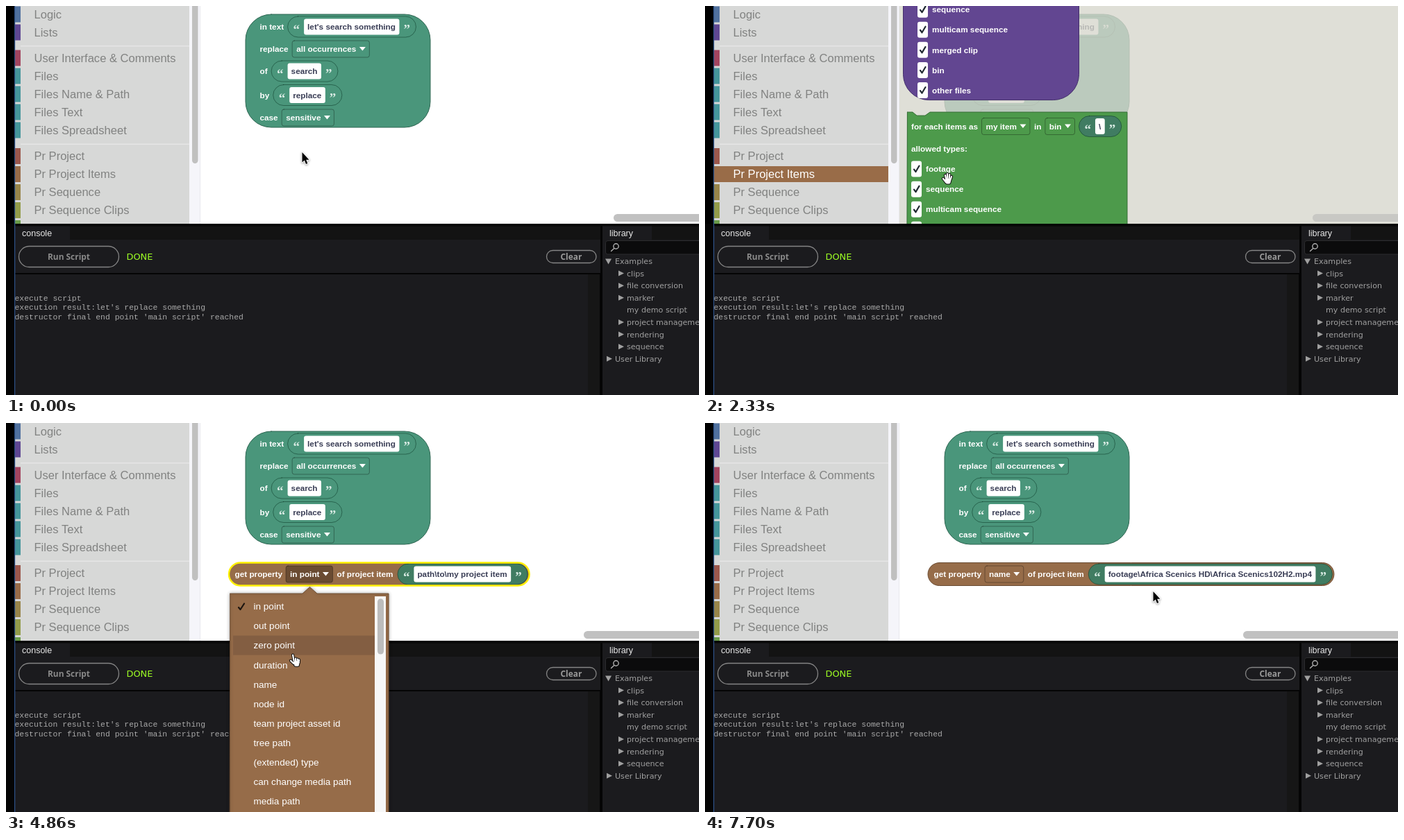
Write an HTML page with a canvas that moves like this. It is 998 by 561 pixels and loops after 8 s.

```html
<!DOCTYPE html>
<html>
<head>
<meta charset="utf-8">
<style>
html, body { margin: 0; width: 100%; height: 100%; overflow: hidden; background: #000; }
canvas { display: block; }
</style>
</head>
<body>
<canvas id="stage" width="998" height="561"></canvas>
<script>
const ctx = document.getElementById('stage').getContext('2d');
const LOOP = 8000;
const SANS = '"Liberation Sans", Arial, sans-serif';
const WIDE = '"DejaVu Sans", sans-serif';
const BLOCK_FONT = 'bold 11.76px ' + SANS;
const TEAL = '#4a967b', STRING = '#407c62', BROWN = '#966c49', GREEN = '#4d9a4b', PURPLE = '#624691';
const YELLOW = '#fff000';
const ITEM_PATH = 'path\\to\\my project item';
const FILE_PATH = 'footage\\Africa Scenics HD\\Africa Scenics102H2.mp4';

const clamp = v => Math.max(0, Math.min(1, v));
const progress = (t, from, to) => clamp((t - from) / (to - from));
const smooth = p => p * p * (3 - 2 * p);
const mix = (a, b, p) => a + (b - a) * p;

function rect(x, y, w, h, color) {
  ctx.fillStyle = color;
  ctx.fillRect(x, y, w, h);
}
function paint(fill, stroke, width = 1) {
  if (fill) { ctx.fillStyle = fill; ctx.fill(); }
  if (stroke) { ctx.strokeStyle = stroke; ctx.lineWidth = width; ctx.stroke(); }
}
function round(x, y, w, h, r, fill, stroke, width) {
  ctx.beginPath();
  ctx.roundRect(x, y, w, h, r);
  paint(fill, stroke, width);
}
function poly(points, fill, stroke, width) {
  ctx.beginPath();
  points.forEach(([x, y]) => ctx.lineTo(x, y));
  ctx.closePath();
  paint(fill, stroke, width);
}
// Text with its capitals centred on cy; returns the right edge.
function text(str, x, cy, font, color) {
  ctx.font = font;
  ctx.fillStyle = color;
  ctx.fillText(str, x, cy + 0.36 * parseFloat(font.match(/[\d.]+px/)[0]));
  return x + ctx.measureText(str).width;
}
const label = (str, x, cy) => text(str, x, cy, BLOCK_FONT, '#fff');

// Block parts
function dropdown(str, x, cy, open) {
  ctx.font = BLOCK_FONT;
  const w = ctx.measureText(str).width + 25;
  round(x, cy - 12, w, 24, 3, open ? '#6a4b32' : null, 'rgba(0,0,0,.32)');
  label(str, x + 6, cy);
  const a = x + w - 10;
  poly([[a - 4.5, cy - 3], [a + 4.5, cy - 3], [a, cy + 2.5]], '#fff');
  return x + w;
}
function stringPill(str, x, cy, fill, { selected, caret } = {}) {
  ctx.font = BLOCK_FONT;
  const tw = ctx.measureText(str).width, end = x + tw + 58;
  const quoteFont = 'bold 19px "Liberation Serif", serif';
  round(x, cy - 15, tw + 58, 30, 15, fill, 'rgba(0,40,25,.45)');
  text('“', x + 8, cy + 3.5, quoteFont, '#d9ebe4');
  text('”', end - 18, cy + 3.5, quoteFont, '#d9ebe4');
  round(x + 23.5, cy - 11.5, tw + 10.5, 23, 3, '#fff');
  if (selected) rect(x + 28.5, cy - 7.5, tw, 15, '#b4d5fe');
  text(str, x + 28.5, cy, BLOCK_FONT, '#393d55');
  if (caret) rect(x + 28.5 + tw, cy - 7, 1, 14, '#000');
  return end;
}
function checkRow(str, x, cy) {
  round(x, cy - 11.5, 15, 23, 3, '#fff');
  ctx.beginPath();
  ctx.moveTo(x + 4, cy + .5);
  ctx.lineTo(x + 6.5, cy + 4);
  ctx.lineTo(x + 11.5, cy - 4.5);
  paint(null, '#222b33', 2.2);
  label(str, x + 21, cy);
}
const notch = (x, y) => [[x + 8, y], [x + 14, y + 5], [x + 26, y + 5], [x + 33, y]];

function propertyRow(verb, x, cy, item, value, state = {}) {
  let end = label(verb + ' property', x, cy);
  end = dropdown(item, end + 5, cy, state.open);
  end = label('of project item', end + 6, cy);
  return stringPill(value, end + 6.5, cy, STRING, state);
}
function getProperty(x, cy, item, value, state) {
  ctx.font = BLOCK_FONT;
  const w = ['get property', item, 'of project item', value]
    .reduce((sum, s) => sum + ctx.measureText(s).width, 0) + 111.5;
  ctx.globalAlpha = state.dragging ? .8 : 1;
  round(x, cy - 16.5, w, 33, 16.5, BROWN);
  ctx.globalAlpha = 1;
  propertyRow('get', x + 8.5, cy, item, value, state);
  round(x, cy - 16.5, w, 33, 16.5, null, state.chosen ? YELLOW : '#6a4b32', state.chosen ? 2.4 : 1);
}

function searchBlock() {
  round(345, 12, 266, 163, 37, TEAL, '#2f6652');
  const rows = [['in text', 30, "let's search something"], ['replace', 62, null, 'all occurrences'],
    ['of', 94, 'search'], ['by', 128.5, 'replace'], ['case', 161, null, 'sensitive']];
  for (const [name, cy, str, choice] of rows) {
    const end = label(name, 365.5, cy) + 5.5;
    str ? stringPill(str, end, cy, null) : dropdown(choice, end, cy);
  }
}

const TYPES = ['footage', 'sequence', 'multicam sequence', 'merged clip', 'bin', 'other files'];

function flyout(scroll, chosen) {
  rect(279, 0, 719, 314, 'rgba(216,216,206,.8)');
  ctx.save();
  ctx.translate(0, -scroll);
  round(285.5, -120, 253, 258.5, 37, PURPLE, '#44306a');
  TYPES.forEach((type, i) => checkRow(type, 306, -21 + 29.1 * i));

  poly([[291, 156], ...notch(291, 156), [608, 156], [608, 400], ...notch(318, 400).reverse(), [318, 400],
    [318, 417], ...notch(318, 417), [608, 417], [608, 441], ...notch(291, 441).reverse(), [291, 441]],
    GREEN, '#356d35');
  let end = label('for each items as', 297, 176.5);
  end = dropdown('my item', end + 5.5, 176.5);
  end = label('in', end + 6, 176.5);
  end = dropdown('bin', end + 5.5, 176.5);
  stringPill('\\', end + 6, 176.5, STRING);
  label('allowed types:', 297, 209);
  TYPES.forEach((type, i) => checkRow(type, 297, 238 + 29.1 * i));
  label('do', 297, 409);

  getProperty(286.5, 481.5, 'in point', ITEM_PATH, { chosen });
  poly([[291, 516], ...notch(291, 516), [726, 516], [726, 560], [291, 560]], BROWN, '#6a4b32');
  propertyRow('set', 297, 537, 'in point', ITEM_PATH);
  ctx.restore();
}

const CATEGORIES = [['Logic', 12, '#50719f'], ['Lists', 38, '#5f4793'],
  ['User Interface & Comments', 75, '#a3445f'], ['Files', 101, '#45969b'],
  ['Files Name & Path', 127, '#45969b'], ['Files Text', 153, '#45969b'],
  ['Files Spreadsheet', 179, '#45969b'], ['Pr Project', 216.5, '#9c574c'],
  ['Pr Project Items', 242.5, '#996c48'], ['Pr Sequence', 268.5, '#98854a'],
  ['Pr Sequence Clips', 294.5, '#939c4a'], ['', 320.5, '#6a9c4a']];

function sidebar(flyoutOpen) {
  rect(13, 0, 251, 314, '#d7d8d7');
  rect(264, 0, 15, 314, '#f5f5fa');
  rect(279, 0, 1, 314, '#e8e8ee');
  round(268, -20, 8.5, 247, 4.2, '#c0c0c0');
  rect(21, 57, 243, 1.5, '#e6e6e6');
  rect(21, 198.5, 243, 1.5, '#e6e6e6');
  for (const [name, cy, color] of CATEGORIES) {
    const active = flyoutOpen && name === 'Pr Project Items';
    rect(13, cy - 11.5, active ? 251 : 8, 23, color);
    text(name, 40.5, cy, '16.55px ' + SANS, active ? '#fff' : '#818281');
  }
}

function panels() {
  rect(0, 314, 998, 247, '#050505');
  rect(13, 317.5, 843, 20, '#131313');
  rect(13, 317.5, 79, 20, '#1b1b1e');
  rect(13, 337, 843, 48, '#1b1b1e');
  rect(13, 387, 825, 174, '#1b1b1e');
  rect(838, 387, 17, 174, '#161616');
  rect(859, 317.5, 139, 20, '#131313');
  rect(859, 317.5, 71, 20, '#1b1b1e');
  rect(859, 337, 139, 224, '#1b1b1e');
  text('console', 23, 327, '12.5px ' + SANS, '#e8e8e8');
  text('library', 869, 327, '12.5px ' + SANS, '#e8e8e8');

  round(18.5, 346.5, 144, 30, 15, null, '#858585', 1.3);
  text('Run Script', 60, 361.5, 'bold 11.9px "Open Sans", sans-serif', '#8a8a8a');
  text('DONE', 173.5, 361.5, '12.9px ' + WIDE, '#9eff24');
  round(778.5, 352.5, 71.5, 18, 9, null, '#858585', 1.3);
  text('Clear', 798.5, 361.5, 'bold 11.9px "Open Sans", sans-serif', '#9a9a9a');

  ['execute script', "execution result:let's replace something",
    "destructor final end point 'main script' reached"].forEach((line, i) =>
    text(line, 12.5, 420.5 + 13.5 * i, '11.44px "Liberation Mono", monospace', '#a9a9a9'));

  round(863.5, 338.5, 150, 19.5, 3, '#0b0b0c', '#2c2c2e');
  ctx.beginPath();
  ctx.arc(878.5, 346.5, 3.7, 0, 7);
  ctx.moveTo(875.8, 349.5);
  ctx.lineTo(871.5, 353.5);
  paint(null, '#b0b0b0', 1.4);

  const tree = [['Examples', 0, 'down'], ['clips', 1, 'right'], ['file conversion', 1, 'right'],
    ['marker', 1, 'right'], ['my demo script', 1], ['project management', 1, 'right'],
    ['rendering', 1, 'right'], ['sequence', 1, 'right'], ['User Library', 0, 'right']];
  tree.forEach(([name, depth, arrow], i) => {
    const x = 865 + 17 * depth, y = 368 + 17.6 * i;
    if (arrow === 'down') poly([[863, y - 3.5], [872, y - 3.5], [867.5, y + 4.5]], '#a0a0a0');
    if (arrow === 'right') poly([[x, y - 4], [x + 8, y], [x, y + 4]], '#a0a0a0');
    text(name, 877 + 17 * depth, y, '11.1px ' + WIDE, '#a0a0a0');
  });
  rect(12, 0, 1.2, 561, '#2d5288');
}

const OPTIONS = ['in point', 'out point', 'zero point', 'duration', 'name', 'node id',
  'team project asset id', 'tree path', '(extended) type', 'can change media path', 'media path'];

function menu(alpha, cursorY) {
  ctx.save();
  ctx.globalAlpha = alpha;
  ctx.shadowColor = 'rgba(0,0,0,.3)';
  ctx.shadowBlur = 5;
  poly([[322.5, 246], [427, 246], [437.5, 236.5], [448, 246], [551, 246], [551, 570], [322.5, 570]],
    BROWN, '#6f4f35');
  ctx.shadowColor = 'transparent';
  const hovered = Math.floor((cursorY - 251) / 28.05);
  if (hovered >= 0) rect(327, 250.5 + 28.05 * hovered, 204, 28, '#835e42');
  OPTIONS.forEach((name, i) => text(name, 356.5, 264.5 + 28.05 * i, '13.55px ' + SANS, '#fff'));
  ctx.beginPath();
  ctx.moveTo(335, 266);
  ctx.lineTo(337.5, 269);
  ctx.lineTo(343, 260.5);
  paint(null, '#1c1510', 2.2);
  rect(531, 250, 16, 311, '#f7f7f7');
  round(535, 253.5, 9, 80, 4.5, '#bcbcbc');
  ctx.restore();
}

// Cursors
function fingers(lines) {
  for (const [grow, color] of [[2, '#111'], [0, '#fff']])
    for (const [x1, y1, x2, y2, width] of lines) {
      ctx.beginPath();
      ctx.moveTo(x1, y1);
      ctx.lineTo(x2, y2);
      paint(null, color, width + grow);
    }
}
const CURSORS = {
  arrow() {
    ctx.shadowColor = 'rgba(0,0,0,.4)';
    ctx.shadowBlur = 3;
    ctx.shadowOffsetY = 1;
    const shape = [[.5, 0], [.5, 14.5], [3.8, 11.5], [6, 17], [8.4, 16], [6.2, 10.8], [10.5, 10.8]];
    poly(shape, null, '#fff', 2);
    ctx.shadowColor = 'transparent';
    poly(shape, '#000');
  },
  open() {
    fingers([[-3, -5, -1.5, 2, 2.2], [0, -7, .3, 2, 2.2], [3.2, -6, 2.5, 2, 2.2], [6, -3, 4, 3, 2.2],
      [-6, 0, -2, 5, 2.4], [-1, 3, 2, 3, 6], [0, 5, 2, 5, 5]]);
  },
  closed() {
    fingers([[-3, -2, -3, 2, 2.4], [0, -3, 0, 2, 2.4], [2.8, -2.5, 2.8, 2, 2.4], [5, -1, 4.5, 2, 2.2],
      [-5, 2, -2, 4, 2.4], [-1, 2.5, 2.5, 2.5, 5]]);
  },
  pointer() {
    fingers([[0, 1, 1.5, 9, 2.2], [4, 6, 4, 10, 2.2], [6.8, 7, 6.5, 11, 2.2], [9, 8, 8.5, 12, 2.2],
      [-3, 9, 1, 13, 2.2], [3, 12, 7, 12, 5], [4, 15, 7, 15, 4]]);
  },
  beam() {
    ctx.beginPath();
    for (const s of [-1, 1]) {
      ctx.moveTo(-3, 8 * s);
      ctx.quadraticCurveTo(0, 8 * s, 0, 5 * s);
      ctx.quadraticCurveTo(0, 8 * s, 3, 8 * s);
    }
    ctx.moveTo(0, -6);
    ctx.lineTo(0, 6);
    paint(null, '#222', 1.2);
  }
};

// time, x, y
const TRACK = [[0, 426, 211], [930, 426, 211], [1460, 147, 238], [1960, 147, 238], [2330, 349, 249],
  [2960, 349, 249], [3430, 362, 223], [3580, 384, 212], [3960, 384, 212], [4090, 420, 214],
  [4600, 420, 214], [4980, 411, 370], [5500, 411, 370], [5770, 640, 222], [6930, 640, 222],
  [7030, 641, 234], [7260, 641, 234], [7400, 645, 243], [LOOP, 645, 243]];

function cursorAt(t) {
  const i = TRACK.findIndex(key => key[0] > t);
  const [t0, x0, y0] = TRACK[i - 1], [t1, x1, y1] = TRACK[i];
  const p = smooth(progress(t, t0, t1));
  return { x: mix(x0, x1, p), y: mix(y0, y1, p) };
}
function cursorKind(t, { x, y }) {
  if (t < 2930) return t > 1960 && x > 287 ? 'open' : 'arrow';
  if (t < 3600) return 'closed';
  if (t < 4040) return 'open';
  if (t < 5060) return y > 246 ? 'pointer' : 'arrow';
  return t > 5600 && y < 236 ? 'beam' : 'arrow';
}

function draw(t) {
  const cursor = cursorAt(t);
  const flyoutOpen = t >= 1660 && t < 2930;
  const placed = t >= 2930, named = t >= 5060, pasted = t >= 6200;
  const menuAlpha = progress(t, 4100, 4260) * (1 - progress(t, 5060, 5200));

  ctx.lineCap = ctx.lineJoin = 'round';
  rect(0, 0, 998, 561, '#000');
  rect(279, 0, 719, 314, '#fff');
  searchBlock();
  if (placed) {
    const p = smooth(progress(t, 2930, 3420));
    const cy = t < 3600 ? mix(255.5, 219.5, p) : 218;
    getProperty(mix(286.5, 321, p), cy, named ? 'name' : 'in point', pasted ? FILE_PATH : ITEM_PATH, {
      chosen: t < 7700,
      dragging: t < 3600,
      open: t >= 4100 && !named,
      selected: t >= 5900 && !pasted,
      caret: pasted && t < 7630 && (t < 6360 || Math.floor((t - 6360) / 335) % 2 === 0)
    });
  }
  if (flyoutOpen) flyout(226 * smooth(progress(t, 2300, 2760)), t >= 2830);

  const barX = pasted ? 775 : named ? 836 : t >= 3600 ? 832 : 875;
  const barHover = t >= 5500 && cursor.y > 298 && cursor.y < 314;
  round(barX, 300, 300, 11, 5.5, barHover ? '#aeaeae' : flyoutOpen ? '#c8c8c4' : '#c1c1c1');

  sidebar(flyoutOpen);
  panels();
  if (menuAlpha > 0) menu(menuAlpha, cursor.y);

  ctx.save();
  ctx.translate(cursor.x, cursor.y);
  CURSORS[cursorKind(t, cursor)]();
  ctx.restore();
}

const start = performance.now();
function frame() {
  draw((performance.now() - start) % LOOP);
  requestAnimationFrame(frame);
}
frame();
</script>
</body>
</html>
```
